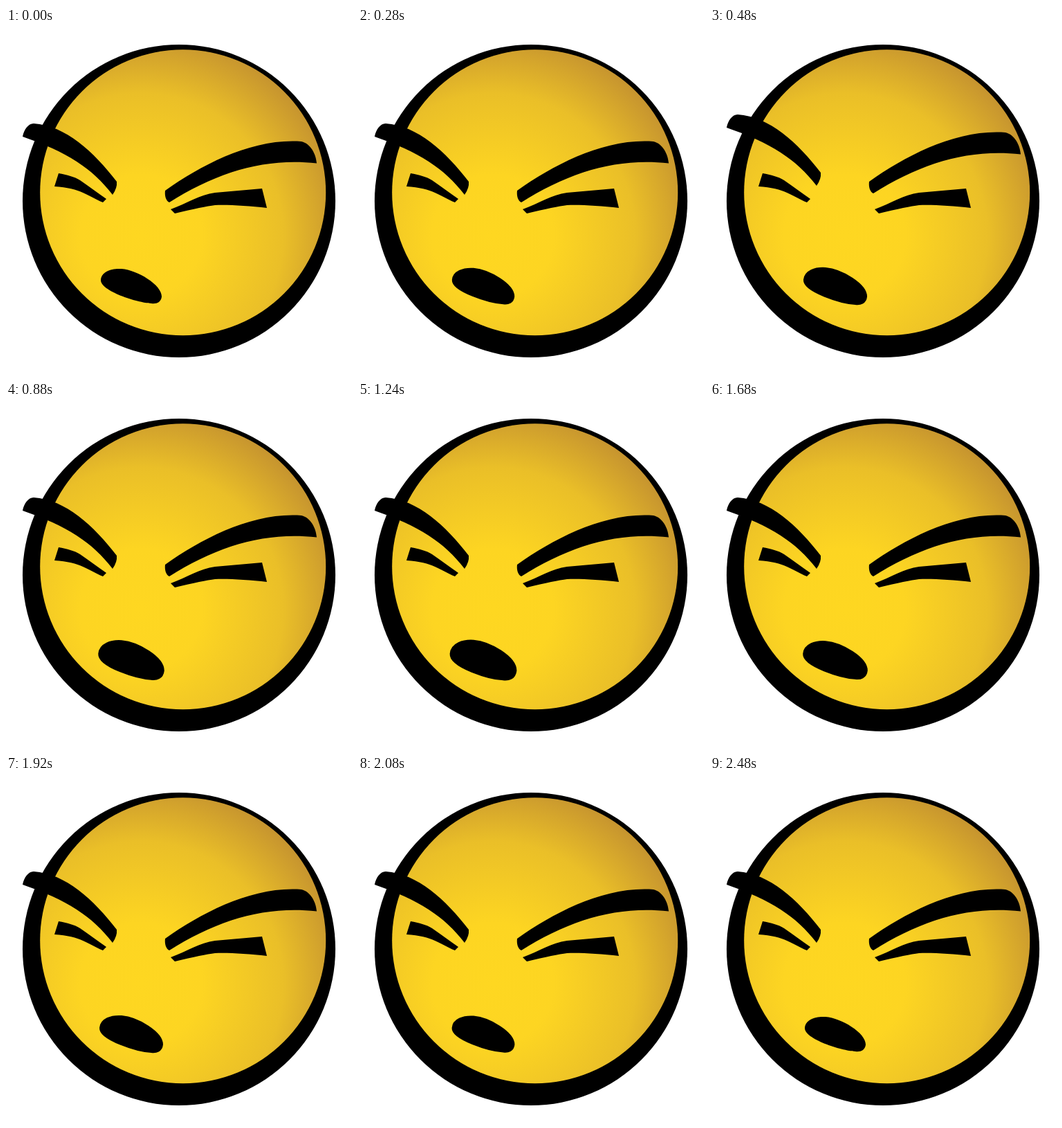
Recreate the animation shown at these times as an HTML page with a canvas. Size 500 by 500 pixels, loop 2520 ms.

```html
<!DOCTYPE html>
<html lang="en">
<head>
<meta charset="utf-8">
<title>Grumpy face</title>
<style>
html, body { margin: 0; width: 100%; height: 100%; overflow: hidden; background: #fff; }
canvas { display: block; width: 500px; height: 500px; }
</style>
</head>
<body>
<canvas id="stage" width="500" height="500"></canvas>
<script>
const ctx = document.getElementById('stage').getContext('2d');
const LOOP = 2520;
const MOUTH_PEAK = 1120;
const MOUTH_REST = 2480;
const MOUTH_GROWTH = 9.6;
const BROW_LIFT = 13;
const TWITCH = 80;
const TWITCH_STARTS = [480, 1600, 2000];

const brows = new Path2D(
  'M24 157C26 147 32 138 40 138C86 141 127 179 160 222Q161 231 154 241C125 203 88 179 24 157Z' +
  'M230 235C284 197 356 159 427 164C440 167 448 182 449 195.5C375 187 305 208 236 252C231 250 229 242 230 235Z');
const eyes = new Path2D(
  'M76 210C88 212 99 215 107 220C120 229 132 238 145 247L140 252C120 244 108 231 70 229Z' +
  'M238 262C262 253 280 241 302 238L370 232L377 260C350 257 320 255 302 256Q285 258 244 268Z');
const mouth = new Path2D(
  'M137 364C138 352 152 347 167 348C190 350 225 371 225 388C224 397 217 399 210 398C190 397 136 380 137 364Z');

const skin = ctx.createRadialGradient(195, 300, 0, 195, 300, 294);
skin.addColorStop(0, '#fed721');
skin.addColorStop(0.3, '#fdd522');
skin.addColorStop(0.7, '#eabf28');
skin.addColorStop(1, '#c6942f');

function disc(x, y, r, fill) {
  ctx.fillStyle = fill;
  ctx.beginPath();
  ctx.arc(x, y, r, 0, Math.PI * 2);
  ctx.fill();
}

function draw(time) {
  const t = time % LOOP;
  ctx.fillStyle = '#fff';
  ctx.fillRect(0, 0, 500, 500);
  disc(250, 250, 226, '#000');
  disc(255.7, 237.7, 206.5, skin);

  ctx.fillStyle = ctx.strokeStyle = '#000';
  ctx.fill(eyes);

  const lifted = TWITCH_STARTS.some(from => t >= from && t < from + TWITCH);
  ctx.save();
  ctx.translate(0, lifted ? -BROW_LIFT : 0);
  ctx.fill(brows);
  ctx.restore();

  // The mouth swells evenly outwards, then shrinks back.
  const open = t < MOUTH_PEAK
    ? t / MOUTH_PEAK
    : Math.max(0, (MOUTH_REST - t) / (MOUTH_REST - MOUTH_PEAK));
  ctx.fill(mouth);
  if (open > 0) {
    ctx.lineJoin = 'round';
    ctx.lineWidth = MOUTH_GROWTH * open;
    ctx.stroke(mouth);
  }
}

let start;
function tick(now) {
  start ??= now;
  draw(Math.max(0, now - start));
  requestAnimationFrame(tick);
}
draw(0);
requestAnimationFrame(tick);
</script>
</body>
</html>
```
